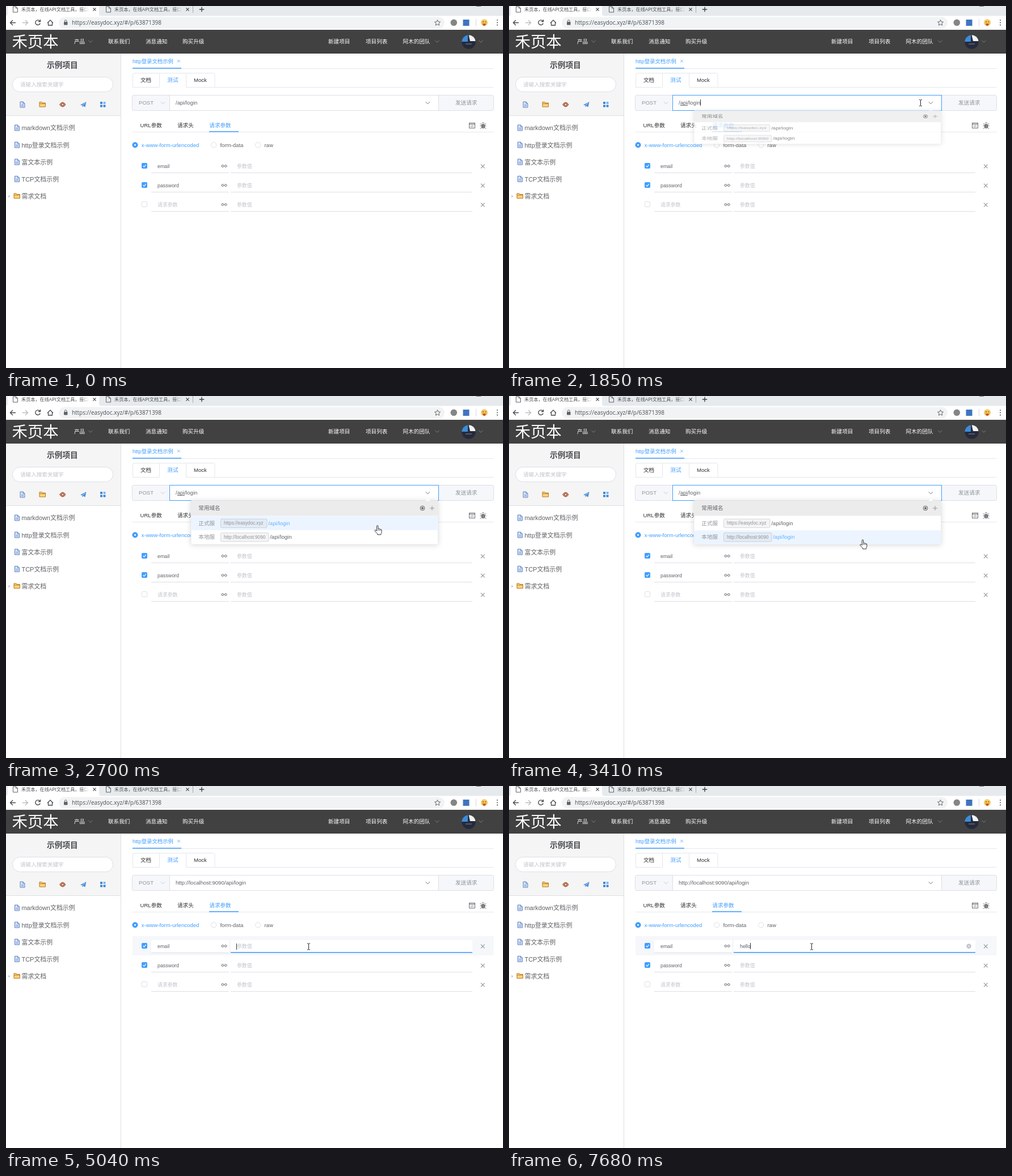
These frames come from a looping animation (876 px wide and 639 px high, 8 s). An HTML page:

```html
<!DOCTYPE html>
<html lang="zh-CN">
<head>
<meta charset="utf-8">
<style>
html, body { margin: 0; width: 100%; height: 100%; overflow: hidden; background: #fff; }
svg { display: block; width: 876px; height: 639px; font-family: "Liberation Sans", "Noto Sans CJK SC", "Noto Sans CJK", sans-serif; }
text { white-space: pre; }
#panel { filter: drop-shadow(0 1.4px 5px rgba(0, 0, 0, .15)); }
</style>
</head>
<body>
<svg id="stage" viewBox="0 0 876 639"></svg>
<script>
const LOOP = 8000, BLINK = 530;
const BLUE = '#409eff', INK = '#303133', TEXT = '#606266', GREY = '#909399',
  PALE = '#c0c4cc', BORDER = '#dcdfe6', RULE = '#e4e7ed', SOFT = '#f5f7fa';
const BASE = 9.58, SMALL = 8.9;

// Static drawing helpers; text is placed by left edge and vertical centre.
const text = (x, cy, s, fill = INK, size = BASE, extra = '') =>
  `<text x="${x}" y="${cy + size * .36}" font-size="${size}" fill="${fill}" ${extra}>${s}</text>`;
const rect = (x, y, w, h, fill, extra = '') =>
  `<rect x="${x}" y="${y}" width="${w}" height="${h}" fill="${fill}" ${extra}/>`;
const path = (d, stroke, w = 1, fill = 'none', extra = '') =>
  `<path d="${d}" stroke="${stroke}" stroke-width="${w}" fill="${fill}" ${extra}/>`;
const circle = (x, y, r, fill, extra = '') => `<circle cx="${x}" cy="${y}" r="${r}" fill="${fill}" ${extra}/>`;
const stroke = (color, w = 1) => `stroke="${color}" stroke-width="${w}"`;
const hline = (x1, x2, y, color = RULE, w = 1) => path(`M${x1} ${y}H${x2}`, color, w);
const cross = (x, y, r, color, w = 1) => path(`M${x - r} ${y - r}l${2 * r} ${2 * r}m0 ${-2 * r}l${-2 * r} ${2 * r}`, color, w);
const plus = (x, y, r, color, w = 1) => path(`M${x - r} ${y}h${2 * r}M${x} ${y - r}v${2 * r}`, color, w);
const chevron = (x, y, color, extra = '') => path(`M${x - 3.6} ${y - 1.8}l3.6 3.6l3.6-3.6`, color, .9, 'none', extra);
const page = (x, y, color, fill) => path(`M${x} ${y}h5l3 3v7h-8zM${x + 5} ${y}v3h3`, color, 1, fill);
const folder = (x, y) => path(`M${x} ${y}h4l1 1.5h5.5v7h-10.5zM${x} ${y + 3}h10.5`, '#b9771f', 1, '#fbd57c');
const bluePage = (x, y) => page(x, y, '#5f82c4', '#d3e0f5') +
  [5.5, 7.5].map(dy => hline(x + 2, x + 6, y + dy, '#5f82c4', .7)).join('');

function browserBar() {
  const title = '禾页本，在线API文档工具，接口';
  const tab = (x, bg) => page(x + .5, 1, '#5f6368', bg) + text(x + 15, 6, title, '#4a4d51', 8.15) +
    rect(x + 120, 0, 15, 14, `url(#fade${x})`) + rect(x + 135, 0, 4, 14, bg) + cross(x + 144, 6, 2.6, '#45494d', 1.2);
  const fade = (x, c) => `<linearGradient id="fade${x}"><stop stop-color="${c}" stop-opacity="0"/><stop offset="1" stop-color="${c}"/></linearGradient>`;
  return `<defs>${fade(12, '#fff')}${fade(176, '#e7eaed')}</defs>` +
    rect(0, 0, 876, 18, '#e7eaed') + path('M0 18q3-1 3-5V0H164V13q0 4 3 5z', 'none', 0, '#fff') +
    tab(12, '#fff') + tab(176, '#e7eaed') + path('M329.5 0V12', '#a5a9ad') + plus(345, 6, 4.2, '#3c4043', 1.4) +
    hline(829, 837, .5, '#777') + path('M861-3l3 3l3-3', '#777') +
    rect(0, 17.5, 876, 24.5, '#fff') + rect(93, 19.5, 680, 20, '#f1f3f4', 'rx="10"') +
    path('M17 29.5H8M12 25l-4.5 4.5l4.5 4.5', '#45494d', 1.4) +
    path('M29 29.5h9M34 25l4.5 4.5l-4.5 4.5', '#babcbe', 1.4) +
    path('M59.5 26.5a4.3 4.3 0 1 0 .7 4M60.5 24v3.5h-3.5', '#45494d', 1.4) +
    path('M73 30l5-5l5 5M74.5 29v5h7v-5', '#45494d', 1.3) +
    rect(102, 28, 6.5, 5.5, '#5f6368', 'rx=".8"') + path('M103.4 28v-1.5a1.8 1.8 0 0 1 3.6 0V28', '#5f6368') +
    text(116, 29.3, 'https://easydoc.xyz/#/p/63871398', '#4c5054', 9.95, 'font-family="Open Sans, Noto Sans, sans-serif"') +
    path('M760.5 24.5l1.5 3.3l3.5.4l-2.6 2.4l.7 3.5l-3.1-1.8l-3.1 1.8l.7-3.5l-2.6-2.4l3.5-.4z', '#5f6368') +
    circle(789.3, 29.3, 5.8, '#858585') + rect(805.5, 24, 11, 11, '#3f74c0') + path('M828.5 23v13', '#d5d7da') +
    circle(843, 29.3, 6, '#f4c95c') + circle(841, 28, .9, '#6b4a20') + hline(844, 846.5, 28, '#6b4a20') +
    path('M840 31h6q-1 4-3 4t-3-4', 'none', 0, '#c2503c') +
    [25, 29.3, 33.6].map(y => circle(866, y, 1.1, '#5f6368')).join('');
}

function siteHeader() {
  const nav = [[120, '产品'], [180, '联系我们'], [246, '消息通知'], [311, '购买升级'],
    [568, '新建项目'], [634, '项目列表'], [699.5, '阿木的团队']];
  return rect(0, 42, 876, 42, '#414141') + text(10.5, 63, '禾页本', '#fff', 27.4, 'font-weight="300"') +
    nav.map(([x, s]) => text(x, 62.5, s, '#fff')).join('') +
    [149, 760, 837].map(x => chevron(x, 62.5, '#858585')).join('') +
    circle(815.5, 63.5, 12.3, '#252b3c') +
    path('M803.2 63A12.3 12.3 0 0 1 814 51.3V63z', 'none', 0, '#3e8bd6') +
    path('M815.5 51.2A12.3 12.3 0 0 1 827.5 62H818z', 'none', 0, '#f1f3f3') + hline(810, 821, 67, '#7c879c');
}

function sidebar() {
  const items = ['markdown文档示例', 'http登录文档示例', '富文本示例', 'TCP文档示例', '需求文档'];
  const grid = [[166, 169], [171.5, 169], [166, 174.5], [171.5, 174.5]];
  return rect(0, 83, 202, 110, '#f5f5f5') + hline(0, 202, 193.5, '#dedfe2') + path('M202.5 83V639', BORDER) +
    text(72, 104, '示例项目', '#4a4c50', 13.7, 'font-weight="700"') +
    rect(11.5, 125.5, 177, 26, '#fff', 'rx="13" ' + stroke(BORDER)) + text(25, 138.3, '请输入搜索关键字', PALE) +
    bluePage(25, 169) + folder(59, 169.5) +
    path('M94.5 174q5.5-8 10.5 0q-5 8-10.5 0z', '#a75a3c', 1, '#c98365') + circle(99.8, 174, 1.8, '#fff', stroke('#7a3c25', .8)) +
    path('M131 174.5l10.5-5.5l-2 9.5l-3-2l-2 2v-3z', 'none', 0, '#4a8fdd') + path('M134.5 175.5l5-4.5', '#fff', .7) +
    grid.map(([x, y], i) => rect(x, y, 4, 4, i === 1 ? '#79b7f2' : '#3d87d8', 'rx=".7"')).join('') +
    items.map((s, i) => {
      const y = 215.5 + i * 30.1;
      return (i < 4 ? bluePage(15.5, y - 5.5) : folder(14, y - 5)) + text(27.5, y, s, TEXT, 10.95);
    }).join('') + path('M4.5 333.5l3 2.5l-3 2.5z', 'none', 0, PALE);
}

function paramRow(name, i) {
  const y = 282.5 + i * 34;
  const link = (x, side) => path(`M${x} ${y - 1.7}h${side * 2}a1.7 1.7 0 0 ${side > 0 ? 1 : 0} 0 3.4h${-side * 2}`, TEXT);
  return rect(223, y - 17.5, 636.5, 34, SOFT, `id="row${i}"`) +
    rect(256, y - 10.5, 137, 22, '#fff') + rect(396, y - 10.5, 426, 22, '#fff') +
    hline(256, 393, y + 12, BORDER) + hline(396, 822, y + 12, BORDER) +
    rect(239.5, y - 5, 9, 9, name ? BLUE : '#fff', 'rx="1" ' + stroke(name ? BLUE : BORDER)) +
    (name ? path(`M241.5 ${y - .3}l2 2l3.2-4`, '#fff', 1.1) : '') +
    text(267, y, name || '请求参数', name ? TEXT : PALE, SMALL) +
    link(383.5, -1) + link(385.5, 1) + hline(382.5, 386.5, y, TEXT) +
    text(407, y, '参数值', PALE, SMALL, `id="hint${i}"`) + cross(840.3, y + .5, 3.3, GREY, 1.1);
}

function toolIcons() {
  return rect(816.5, 206.5, 10, 9, '#fff', stroke(TEXT, .9)) + hline(816, 827, 208.5, TEXT) +
    path('M820 210.5l-1.5 1.5l1.5 1.5M823 210.5l1.5 1.5l-1.5 1.5M822 210l-1 4', TEXT, .7) +
    `<ellipse cx="841" cy="212.3" rx="3" ry="4" fill="${TEXT}"/>` + path('M841 210v6', '#fff', .7) +
    path('M838.7 207.5q2.3-3.5 4.6 0M835.5 211.5h2.5M844 211.5h2.5M835.7 207.5l2.8 2M846.3 207.5l-2.8 2M835.7 216.5l2.8-2M846.3 216.5l-2.8-2', TEXT, .9);
}

function content() {
  const radio = (x, s, on) => circle(x, 245.3, 4.6, on ? BLUE : '#fff', stroke(on ? BLUE : BORDER)) +
    (on ? circle(x, 245.3, 1.5, '#fff') : '') + text(x + 11.2, 245.3, s, on ? BLUE : TEXT);
  return text(223, 97.3, 'http登录文档示例', BLUE, 9.4) + cross(304.5, 97.3, 2.2, BLUE, .8) +
    hline(223, 859.5, 110.5) + hline(223, 309, 109.7, BLUE, 1.4) +
    path('M223.5 143V121q0-2.5 2.5-2.5H365.5q2.5 0 2.5 2.5V143M270.5 118.5V143M317.5 118.5V143', RULE) +
    hline(223, 270.5, 143.5) + hline(317.5, 859.5, 143.5) +
    text(237, 131, '文档') + text(284.3, 131, '测试', BLUE) + text(331, 131, 'Mock') +
    rect(222.5, 157.5, 637, 27, SOFT, 'rx="2.7" ' + stroke(BORDER)) +
    text(234, 171, 'POST', GREY) + chevron(276.5, 171, PALE) + text(792, 171, '发送请求', GREY) +
    rect(288.5, 157.5, 474, 27, '#fff', 'id="field" ' + stroke(BORDER)) +
    rect(725, 158, 37.5, 26, '#ecf5ff', 'id="drop"') + chevron(743.3, 171, TEXT, 'id="arrow"') +
    text(299, 171, '', TEXT, BASE, 'id="address"') + path('M302 175.5H315', '#666', 1, 'none', 'id="spell"') +
    text(236.5, 210.5, 'URL参数') + text(302, 210.5, '请求头') + text(358.3, 210.5, '请求参数', BLUE) +
    hline(223, 859.5, 222.5) + hline(358, 410, 221.8, BLUE, 1.4) + toolIcons() +
    radio(227.5, 'x-www-form-urlencoded', true) + radio(366.2, 'form-data') + radio(444.2, 'raw') +
    ['email', 'password', ''].map(paramRow).join('') +
    path('', BLUE, 1.5, 'none', 'id="focusLine"') + text(407, 282.5, '', TEXT, SMALL, 'id="typed"') +
    `<g id="clear">${circle(810.5, 282.7, 4.2, PALE)}${cross(810.5, 282.7, 1.5, '#fff', .9)}</g>`;
}

function menu() {
  const option = (y, label, host, w, id) => text(339.3, y, label, GREY) +
    rect(378.5, y - 7.5, w, 15.5, 'rgba(144,147,153,.1)', 'rx="2" ' + stroke('rgba(144,147,153,.32)')) +
    text(384, y, host, GREY, 8.2) + text(378.5 + w + 2.2, y, '/api/login', TEXT, BASE, `id="${id}"`);
  return `<g id="menu"><g id="panel">${rect(326, 184.5, 435.5, 77.5, '#fff', 'rx="2.5" ' + stroke(RULE, .7))}</g>` +
    rect(326, 184.5, 435.5, 27, '#ececec') + path('M739.5 185l4-4l4 4z', 'none', 0, '#fff') +
    text(339.3, 198, '常用域名', TEXT) + circle(734, 198, 3.9, 'none', stroke(TEXT)) + circle(734, 198, 2, TEXT) +
    plus(751, 198, 3.9, GREY) + rect(326, 0, 435.5, 24.8, '#ecf5ff', 'id="hover"') +
    option(224.5, '正式服', 'https://easydoc.xyz', 81.5, 'option0') +
    option(249, '本地服', 'http://localhost:9090', 84.5, 'option1') + '</g>';
}

const cursors = `<g id="cursor">
  <g id="point">${path('M0 0V11.5l2.7-2.4l1.9 4l1.9-.9l-1.8-3.9h3.6z', '#222', .9, '#fff')}</g>
  <g id="hand">${path('M-.3 8V1q0-1.3 1.2-1.3T2.1 1V5.5q1.6-.9 2.2.5q1.6-.6 2.1.7q1.9-.3 1.9 1.3V11q0 2-1.2 3.5V16H1V14.5L-3.3 10q-1.2-2 .6-2.3q1.2 0 2.4 1.8z', '#222', .9, '#fff')}
    ${path('M2.1 6V9M4.3 6.5V9M6.4 7V9', '#222', .7)}</g>
  <g id="beam">${path('M-2.5-5.5h1.7l.8.7l.8-.7h1.7M0-5V5M-2.5 5.5h1.7l.8-.7l.8.7h1.7', '#222')}</g></g>`;

const stage = document.getElementById('stage');
stage.innerHTML = rect(0, 0, 876, 639, '#fff') + content() + sidebar() + siteHeader() + browserBar() + menu() +
  rect(0, 0, 1, 11, INK, 'id="caret"') + cursors;
const el = {};
stage.querySelectorAll('[id]').forEach(e => el[e.id] = e);

const show = (id, on) => el[id].setAttribute('visibility', on ? 'visible' : 'hidden');
const set = (id, name, value) => el[id].setAttribute(name, value);
const clamp = v => Math.min(1, Math.max(0, v));
const easeOut = p => 1 - (1 - clamp(p)) ** 4;
const within = (v, a, b) => v >= a && v < b;

const ENTER = 220, OPEN = 1760, PICK = 4110, FOCUS = 4890;
const moves = [[ENTER, 700, 590], [980, 742, 174], [1200, 733, 172], [1440, 725.5, 171], [2200, 725.5, 171],
  [2990, 622.5, 254], [4300, 622.5, 254], [4720, 533.5, 283.5]];
const typing = [[5820, 'h'], [5970, 'he'], [6450, 'hel'], [6680, 'helo'], [7210, 'hel'], [7530, 'hell'], [7680, 'hello']];

function pointer(t) {
  const next = moves.findIndex(m => m[0] > t);
  if (next < 0) return moves[moves.length - 1].slice(1);
  const [t0, x0, y0] = moves[Math.max(0, next - 1)], [t1, x1, y1] = moves[next];
  const p = clamp((t - t0) / (t1 - t0 || 1)), s = p * p * (3 - 2 * p);
  return [x0 + (x1 - x0) * s, y0 + (y1 - y0) * s];
}

function drawPointer(t, x, y, overField, overDrop, inMenu) {
  const row = Math.floor((y - 265) / 34), inRow = y - 265 - row * 34;
  const overParam = within(row, 0, 3) && within(x, 396, 822) && within(inRow, 7, 29);
  let kind = 'point';
  if (inMenu) kind = y > 212 ? 'hand' : 'point';
  else if (overDrop) kind = 'hand';
  else if (overField || overParam) kind = 'beam';
  ['point', 'hand', 'beam'].forEach(k => show(k, t >= ENTER && k === kind));
  set('cursor', 'transform', `translate(${x} ${y})`);
  for (let i = 0; i < 3; i++) show('row' + i, t >= ENTER && !inMenu && row === i);
}

function render(t) {
  const [x, y] = pointer(t);
  const editing = within(t, OPEN, PICK);
  const onBar = t >= ENTER && within(y, 157, 185);
  const overDrop = onBar && within(x, 728, 763), overField = onBar && within(x, 289, 728);
  const inMenu = editing && y > 185;
  drawPointer(t, x, y, overField, overDrop, inMenu);

  set('field', 'stroke', editing ? BLUE : overField ? PALE : BORDER);
  show('drop', overDrop);
  set('arrow', 'stroke', overDrop ? '#a9cdf0' : TEXT);
  el.address.textContent = t < PICK ? '/api/login' : 'http://localhost:9090/api/login';
  show('spell', editing);

  const open = t < PICK ? easeOut((t - OPEN) / 300) : 1 - easeOut((t - PICK) / 300);
  set('menu', 'opacity', open);
  set('menu', 'transform', `translate(0 184.5) scale(1 ${Math.max(open, .001)}) translate(0 -184.5)`);
  const option = inMenu && y >= 212 ? (y < 237 ? 0 : 1) : -1;
  show('hover', option >= 0);
  set('hover', 'y', option === 0 ? 212 : 237);
  [0, 1].forEach(i => set('option' + i, 'fill', option === i ? '#66b1ff' : TEXT));

  const key = typing.filter(k => k[0] <= t).pop();
  const value = key ? key[1] : '';
  el.typed.textContent = value;
  show('hint0', !value);
  show('clear', value);
  const half = t < FOCUS ? 0 : 213 * easeOut((t - FOCUS + 40) / 200);
  set('focusLine', 'd', half ? `M${609 - half} 293.8H${609 + half}` : '');

  const since = editing ? 1820 : key ? key[0] : FOCUS + 20;
  const lit = Math.floor(Math.max(0, t - since) / BLINK) % 2 === 0;
  show('caret', lit && (editing || t >= FOCUS));
  set('caret', 'x', editing ? 337 : Math.floor(406.6 + (value ? el.typed.getComputedTextLength() : 0)));
  set('caret', 'y', editing ? 165 : value ? 277 : 278);
}

function tick() {
  render(performance.now() % LOOP);
  requestAnimationFrame(tick);
}
tick();
</script>
</body>
</html>
```
